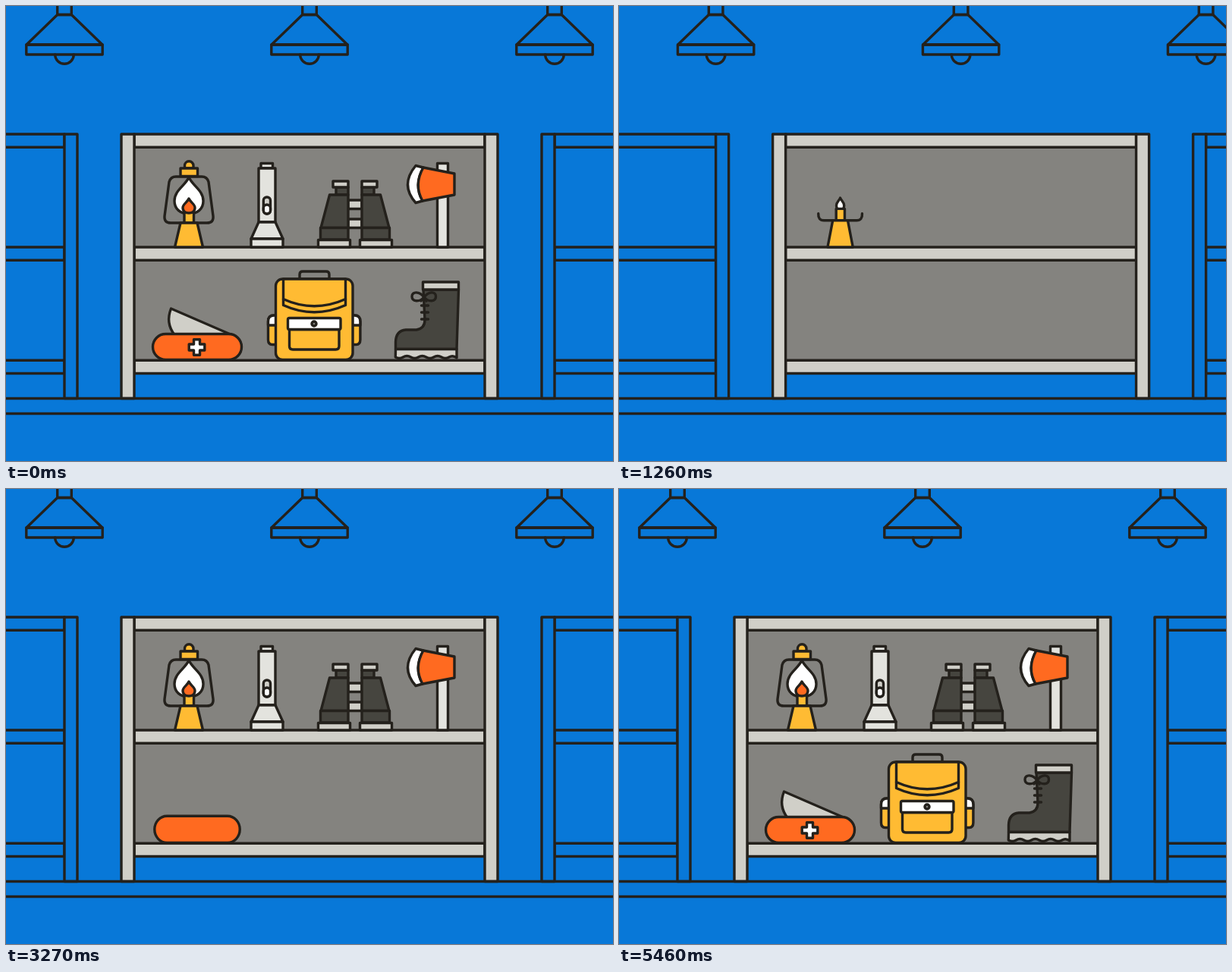
An HTML page with a canvas for the animation above (5.49 s loop, 800 px wide and 600 px high).

```html
<!DOCTYPE html>
<html lang="en">
<head>
<meta charset="utf-8">
<title>Outfitter shelf</title>
<style>
html, body { margin: 0; width: 100%; height: 100%; overflow: hidden; background: #0878d8 }
canvas { display: block }
</style>
</head>
<body>
<canvas id="stage" width="800" height="600"></canvas>
<script>
const ctx = document.getElementById('stage').getContext('2d');
const LOOP = 5490, SCROLL = 1770, SPAN = 1292, LAMP_GAP = 323;
const BLUE = '#0878d8', INK = '#24211c', GREY = '#84837f', STEEL = '#d0cfc8', PALE = '#e3e3de',
      DARK = '#46453f', YELLOW = '#ffbb33', ORANGE = '#ff6a20', WHITE = '#fff';

// timing helpers
const clamp = k => Math.max(0, Math.min(1, k));
const part = (t, start, dur) => clamp((t - start) / dur);
const smooth = k => 1 - (1 - k) ** 3;
const back = k => k <= 0 ? 0 : 1 + 2.7 * (k - 1) ** 3 + 1.7 * (k - 1) ** 2;
const pop = (t, start, dur = 270) => back(part(t, start, dur));

function scrollEase(x) {
  if (x >= 1) return 1;
  let lo = 0, hi = 1;
  for (let i = 0; i < 26; i++) {
    const s = (lo + hi) / 2, u = 1 - s;
    if (3 * u * u * s * .325 + 3 * u * s * s * .06 + s ** 3 < x) lo = s; else hi = s;
  }
  return lo * lo * (3 - 2 * lo);
}

// drawing helpers: shapes are transformed, line weight stays constant
const ID = new DOMMatrix();
let group = ID;
const scaled = (x, y, sx, sy = sx) => ID.translate(x, y).scale(sx, sy).translate(-x, -y);
const rise = (x, y, sy) => scaled(x, y, sy > 1 ? 2 - sy : .5 + .5 * sy, sy);
const mirror = x => scaled(x, 0, -1, 1);

function draw(d, fill, m = ID) {
  const all = group.multiply(m);
  if (Math.abs(all.a * all.d - all.b * all.c) < .0004) return;
  const path = new Path2D();
  path.addPath(new Path2D(d), all);
  if (fill) { ctx.fillStyle = fill; ctx.fill(path); }
  ctx.stroke(path);
}
const box = (x, y, x2, y2) => `M${x} ${y}H${x2}V${y2}H${x}Z`;
const round = (x, y, x2, y2, r) =>
  `M${x + r} ${y}H${x2 - r}a${r} ${r} 0 0 1 ${r} ${r}V${y2 - r}a${r} ${r} 0 0 1 ${-r} ${r}` +
  `H${x + r}a${r} ${r} 0 0 1 ${-r} ${-r}V${y + r}a${r} ${r} 0 0 1 ${r} ${-r}Z`;

function lantern(t) {
  group = rise(241, 318, pop(t, 1140, 210));
  const cage = 'M241 286H217Q208 286 209 277L215 232Q217 225 224 225H241';
  const trim = part(t, 1200, 200);
  if (trim) {
    ctx.setLineDash(trim < 1 ? [115 * trim, 999] : []);
    draw(cage);
    draw(cage, null, mirror(241));
    ctx.setLineDash([]);
  }
  draw('M241 226C246 237 260 243 260 257C260 268 252 274 241 274S222 268 222 257C222 243 236 237 241 226Z',
    WHITE, scaled(241, 273, pop(t, 1240, 300)));
  draw(box(235, 272, 247.5, 286), YELLOW);
  draw('M230 286H252L259.5 318H222.5Z', YELLOW);
  draw('M241 254C243 259 249 261 249 266C249 271 245 273 241 273S233 271 233 266C233 261 239 259 241 254Z',
    ORANGE, scaled(241, 273, pop(t, 1380)));
  const cap = scaled(241, 225, pop(t, 1400));
  draw('M235.5 214V210.5A5.7 5.7 0 0 1 247 210.5V214Z', YELLOW, cap);
  draw(box(230, 214, 252.5, 224.5), YELLOW, cap);
}

function flashlight(t) {
  draw(box(336, 207.5, 351.5, 214), PALE, scaled(344, 214, 1, pop(t, 1800, 180)));
  draw(box(333, 214, 355, 285), PALE, scaled(344, 285, 1, pop(t, 1680, 240)));
  draw('M333 285H355L365 307H323Z', PALE, scaled(344, 307, 1, pop(t, 1620, 210)));
  draw(box(323, 307, 365, 318), PALE, rise(344, 318, pop(t, 1560, 210)));
  const button = scaled(344, 263, pop(t, 1830, 210));
  draw(round(339.3, 252, 348.5, 274, 4.5), STEEL, button);
  draw(round(339.3, 262, 348.5, 274, 4.5), WHITE, button);
}

function binoculars(t) {
  group = rise(460, 318, pop(t, 2040, 180));
  const near = 10 * (1 - pop(t, 2215, 300));
  for (const y of [256, 281]) draw(box(451 + near, y, 469 - near, y + 11.5), STEEL);
  const left = ID.translate(near, 0);
  for (const m of [left, mirror(460).multiply(left)]) {
    draw(box(435, 239, 451, 249), DARK, m);
    draw('M426.5 249H451V292.5H415Z', DARK, m);
    draw(box(414.5, 292.5, 451, 308), DARK, m);
    draw(box(431, 231, 451, 239), STEEL, m);
    if (near < 6) draw(box(411.5, 308.5, 453.5, 318), STEEL, m);
  }
  if (near >= 6) draw(box(411.5 + near, 308.5, 508.5 - near, 318), STEEL);
}

function axe(t) {
  draw(box(568.5, 207.5, 582.5, 318), PALE, rise(575.5, 318, pop(t, 2520, 270)));
  const head = scaled(583, 235, pop(t, 2670, 300));
  draw('M540 210.5L550 213Q537 236 549 257L540 259.5Q519 236 540 210.5Z', WHITE, head);
  draw('M550 213L591 221V249L549 257Q537 236 550 213Z', ORANGE, head);
}

function knife(t) {
  const open = pop(t, 3320, 360);
  if (open) {
    const turn = ID.translate(293, 434).rotate(-24 * (1 - open)).translate(-293, -434);
    if (open < 1) turn.rotateSelf(0);
    const hidden = ID.translate(293, 434).rotate(-26 * (1 - open)).translate(-293, -434);
    draw('M217.5 399L297 433.5H222Q210 418 217.5 399Z', STEEL, hidden);
  }
  draw(round(193.5, 432.5, 310.5, 466.5, 17), ORANGE, rise(252, 466.5, pop(t, 3135, 330)));
  draw('M247.5 439.7h8v6.3h6.3v8h-6.3v6.3h-8v-6.3h-6.3v-8h6.3Z', WHITE, scaled(251.5, 450, pop(t, 3440)));
}

function backpack(t) {
  group = rise(406.2, 466.5, pop(t, 4005, 330));
  draw('M387 360V354Q387 350 391 350H422Q426 350 426 354V360Z', GREY,
    scaled(406, 360, 1, pop(t, 4320, 240)));
  const side = ID.translate(12 * (1 - pop(t, 4260)), 0);
  if (t > 4260) for (const m of [side, mirror(406.2).multiply(side)]) {
    draw('M356 408H353Q345.5 408 345.5 416V440Q345.5 446.5 351 446.5H356Z', YELLOW, m);
    draw('M356 408H353Q345.5 408 345.5 416V421H356Z', WHITE, m);
  }
  draw(round(355.5, 360, 457, 466.5, 9), YELLOW);
  const flap = scaled(406, 360, 1, pop(t, 4170));
  draw('M365.5 360V394.5Q406 413 447.5 394.5V360Z', YELLOW, flap);
  draw('M365.5 386.5Q406 405 447.5 386.5', null, flap);
  draw('M373.5 426.5H439V448.5Q439 453 434.5 453H378Q373.5 453 373.5 448.5Z', YELLOW,
    scaled(406, 426.5, 1, pop(t, 4290)));
  draw(round(371.5, 411.5, 441, 426.5, 2), WHITE, scaled(406, 419, pop(t, 4230)));
  draw(round(403, 416, 409, 422, 3), GREY, scaled(406, 419, pop(t, 4400, 210)));
}

function boot(t) {
  group = rise(554, 465, pop(t, 4620, 300));
  draw('M550 374H596.5L594 452.5H513.5V443Q514 428 527 427H541Q552 425 552 414Z', DARK);
  draw('M513.5 452.5H594V464q-5-4-10-1' + 't-10.1 0'.repeat(7) + 'Z', STEEL);
  draw(box(549.5, 364, 596.5, 374), STEEL, scaled(573, 374, 1, pop(t, 4770, 210)));
  [413, 404, 395].forEach((y, i) =>
    draw(`M547.5 ${y}h9`, null, scaled(552, y, smooth(part(t, 4830 + i * 60, 120)), 1)));
  draw('M551 384C545 376 535 376 535 383S545 391 551 384C557 376 566.5 376 566.5 383S557 391 551 384' +
    'l-4 5M551 384l3 5', null, scaled(551, 384, pop(t, 5010, 270)));
}

const items = [lantern, flashlight, binoculars, axe, knife, backpack, boot];

function shelf(x, width, filled) {
  const end = x + width, post = 17, tops = [169, 318, 467.3];
  if (filled) {
    ctx.fillStyle = GREY;
    ctx.fillRect(x + post, 169, width - 2 * post, 300);
  }
  const fill = filled ? STEEL : BLUE;
  for (const y of tops) draw(box(x + post, y, end - post, y + 17.2), fill);
  for (const px of [x, end - post]) draw(box(px, 169, px + post, 517.5), fill);
}

function stocked(x, t) {
  ctx.save();
  ctx.translate(x, 0);
  shelf(152, 496, true);
  for (const item of items) {
    item(t);
    group = ID;
  }
  ctx.restore();
}

function lamp(x) {
  const m = ID.translate(x, 0);
  draw('M-9.3-6V11.5H9.3V-6', null, m);
  draw('M-9.3 11.5L-50 51H50L9.3 11.5Z', null, m);
  draw(box(-50.2, 51, 50.2, 64), null, m);
  draw('M-12.3 64A12.3 12.3 0 0 0 12.3 64', null, m);
}

function render(t) {
  const x = -SPAN * scrollEase(t / SCROLL);
  ctx.fillStyle = BLUE;
  ctx.fillRect(0, 0, 800, 600);
  ctx.strokeStyle = INK;
  ctx.lineWidth = 3.4;
  ctx.lineJoin = ctx.lineCap = 'round';
  for (let lx = 77 + x % LAMP_GAP - LAMP_GAP; lx < 1200; lx += LAMP_GAP) lamp(lx);
  for (const k of [-1, 0, 1]) shelf(x + 706 + k * SPAN, 680, false);
  stocked(x, LOOP);
  stocked(x + SPAN, t);
  draw('M-5 517.5H805M-5 537.5H805');
}

const began = performance.now();
function tick() {
  render((performance.now() - began) % LOOP);
  requestAnimationFrame(tick);
}
tick();
</script>
</body>
</html>
```
